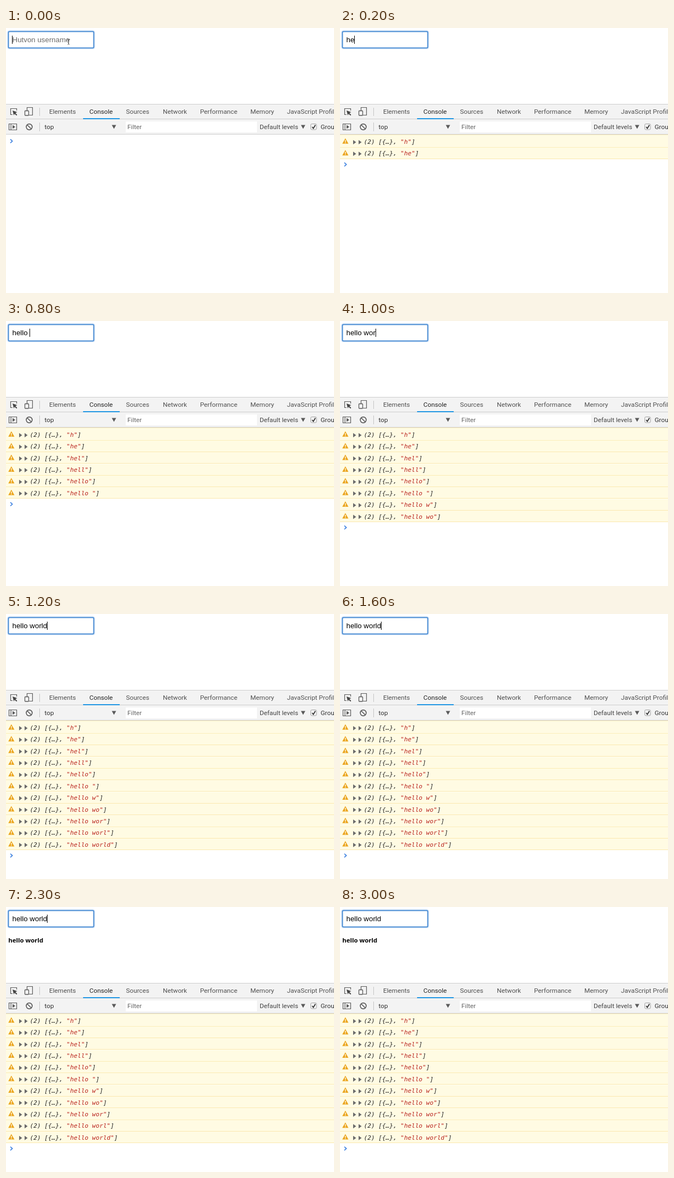
Animation of 600x485 px, one loop 3100 ms. Source, as an HTML page with a canvas:

```html
<!DOCTYPE html>
<html lang="en">
<head>
<meta charset="utf-8">
<title>Typing with console log</title>
<style>
  html, body { margin: 0; width: 100%; height: 100%; overflow: hidden; background: #fff; }
  canvas { display: block; }
</style>
</head>
<body>
<canvas id="stage" width="600" height="485"></canvas>
<script>
const ctx = document.getElementById('stage').getContext('2d');
const LOOP = 3100, STEP = 100, ROW = 21.37;
const PHRASE = 'hello world';
// Letters typed and rows logged after each step
const TYPED = [0, 1, 2, 3, 4, 5, 5, 6, 6, 8, 9, 10, 11];
const LOGGED = [0, 1, 2, 3, 4, 5, 5, 6, 6, 7, 8, 10, 11];
const LAST_KEY = 1200, RESULT_AT = 2000, BLINK = 500;

const UI = '11.8px Roboto, sans-serif';
const FIELD = '13.33px "Liberation Sans", Arial, sans-serif';
const MONO = 'italic 11.15px "DejaVu Sans Mono", monospace';
const RESULT = 'bold 11.4px "Open Sans", sans-serif';
const GREY = '#5a5a5a';

function rect(x, y, w, h, color) {
  ctx.fillStyle = color;
  ctx.fillRect(x, y, w, h);
}

function text(str, x, y, font, color) {
  ctx.font = font;
  ctx.fillStyle = color;
  ctx.fillText(str, x, y);
}

function fill(points, color) {
  ctx.beginPath();
  points.forEach(([x, y]) => ctx.lineTo(x, y));
  ctx.fillStyle = color;
  ctx.fill();
}

function line(points, color, width = 1) {
  ctx.beginPath();
  points.forEach(([x, y]) => ctx.lineTo(x, y));
  ctx.strokeStyle = color;
  ctx.lineWidth = width;
  ctx.stroke();
}

function box(x, y, w, h, r, color, width = 1) {
  ctx.beginPath();
  ctx.roundRect(x, y, w, h, r);
  ctx.strokeStyle = color;
  ctx.lineWidth = width;
  ctx.stroke();
}

const down = (x, y) => fill([[x, y], [x + 8, y], [x + 4, y + 7]], GREY);
const right = (x, y) => fill([[x, y - 4], [x + 5.5, y], [x, y + 4]], '#6a6a6a');

function drawField(value, caretOn) {
  box(4, 6, 157, 31, 2.5, '#b9d4f2', 3);
  box(4.5, 6.5, 156, 30, 2, '#3f84cf', 1.5);
  if (value) text(value, 11.5, 26, FIELD, '#000');
  else {
    text('Hutvon username', 11.5, 26, FIELD, '#6a6a6a');
    line([[112, 20.5], [113.5, 21], [114.5, 22], [114.5, 29], [113, 30.5]], '#333');
    line([[117, 20.5], [115.5, 21], [114.5, 22], [114.5, 29], [116, 30.5]], '#333');
  }
  ctx.font = FIELD;
  if (caretOn) rect(Math.round(11.3 + ctx.measureText(value).width), 14, 1, 15, '#000');
}

function drawTabs() {
  rect(0, 139, 600, 56, '#f3f3f3');
  for (const y of [139, 166, 194]) rect(0, y, 600, 1, '#cdcdcd');

  // Inspect
  line([[12, 158.5], [8.5, 158.5], [8.5, 147.5], [19.5, 147.5], [19.5, 151]], GREY, 1.2);
  fill([[12, 151], [20.5, 154], [17.3, 155.6], [20.5, 159], [19, 160.3], [15.8, 157], [14.3, 160]], '#444');
  // Device mode
  line([[38.5, 151], [38.5, 145.5], [48.5, 145.5], [48.5, 159.5], [42, 159.5]], GREY, 1.2);
  box(34.5, 151.5, 7, 8.5, 1, GREY, 1.3);
  rect(61, 146, 1, 15, '#c4c4c4');

  const tabs = [['Elements', 79], ['Console', 152.5], ['Sources', 219.5], ['Network', 287],
    ['Performance', 355], ['Memory', 447], ['JavaScript Profiler', 514]];
  for (const [name, x] of tabs) text(name, x, 157, UI, name === 'Console' ? '#222' : '#505050');
  rect(141, 165, 67, 2, '#2196e3');
}

function drawFilterBar() {
  // Sidebar toggle
  box(5.5, 175.5, 14, 11, 0, GREY, 1.2);
  rect(8.5, 175, 1.2, 12, GREY);
  fill([[12, 177.5], [17, 181], [12, 184.5]], GREY);
  // Clear
  ctx.beginPath();
  ctx.arc(42.5, 181, 5.4, 0, 7);
  ctx.strokeStyle = GREY;
  ctx.lineWidth = 1.6;
  ctx.stroke();
  line([[38.7, 177.2], [46.3, 184.8]], GREY, 1.6);
  rect(61, 173, 1, 16, '#c4c4c4');

  text('top', 70.5, 185, UI, '#333');
  down(193.5, 177.5);
  rect(219, 171, 240, 20, '#fff');
  text('Filter', 222, 185, UI, '#666');
  text('Default levels', 464, 185, UI, '#444');
  down(539.5, 177.5);
  box(557.5, 175.5, 10.5, 10.5, 2, '#a2a2a2');
  line([[560, 181], [562.2, 183.8], [566, 177.5]], '#333', 1.7);
  text('Group similar', 575.5, 185, UI, '#333');
}

function drawRow(i) {
  const y = 208 + i * ROW;
  const top = i ? y - 10.6 : 195;
  const bottom = Math.round(y + 10.6);
  rect(0, top, 600, bottom - top, '#fffbe3');
  if (!i) rect(0, 195, 600, 1, '#fbebb8');
  rect(0, bottom - 1, 600, 1, '#fbe8ad');

  fill([[9.8, y - 6.2], [15.4, y + 3.8], [4.2, y + 3.8]], '#eba51c');
  rect(9.1, y - 2.8, 1.4, 3.4, '#fff');
  rect(9.1, y + 1.5, 1.4, 1.3, '#fff');
  right(24, y + 1);
  right(34, y + 1);

  const head = '(2) [{…}, ', str = `"${PHRASE.slice(0, i + 1)}"`;
  let x = 43.5;
  for (const [part, color] of [[head, '#222'], [str, '#b9211c'], [']', '#222']]) {
    text(part, x, y + 4, MONO, color);
    x += ctx.measureText(part).width;
  }
}

function draw(t) {
  const step = Math.min(Math.floor(t / STEP), TYPED.length - 1);
  const rows = LOGGED[step];
  const caretOn = t < LAST_KEY || Math.floor((t - LAST_KEY) / BLINK) % 2 === 0;

  rect(0, 0, 600, 485, '#fff');
  drawField(PHRASE.slice(0, TYPED[step]), caretOn);
  if (t >= RESULT_AT) text(PHRASE, 4.3, 65, RESULT, '#000');
  drawTabs();
  drawFilterBar();
  for (let i = 0; i < rows; i++) drawRow(i);
  const y = 207 + rows * ROW;
  line([[8, y - 3.3], [11.6, y], [8, y + 3.3]], '#377ddf', 1.6);
}

function tick() {
  draw(performance.now() % LOOP);
  requestAnimationFrame(tick);
}
tick();
</script>
</body>
</html>
```
